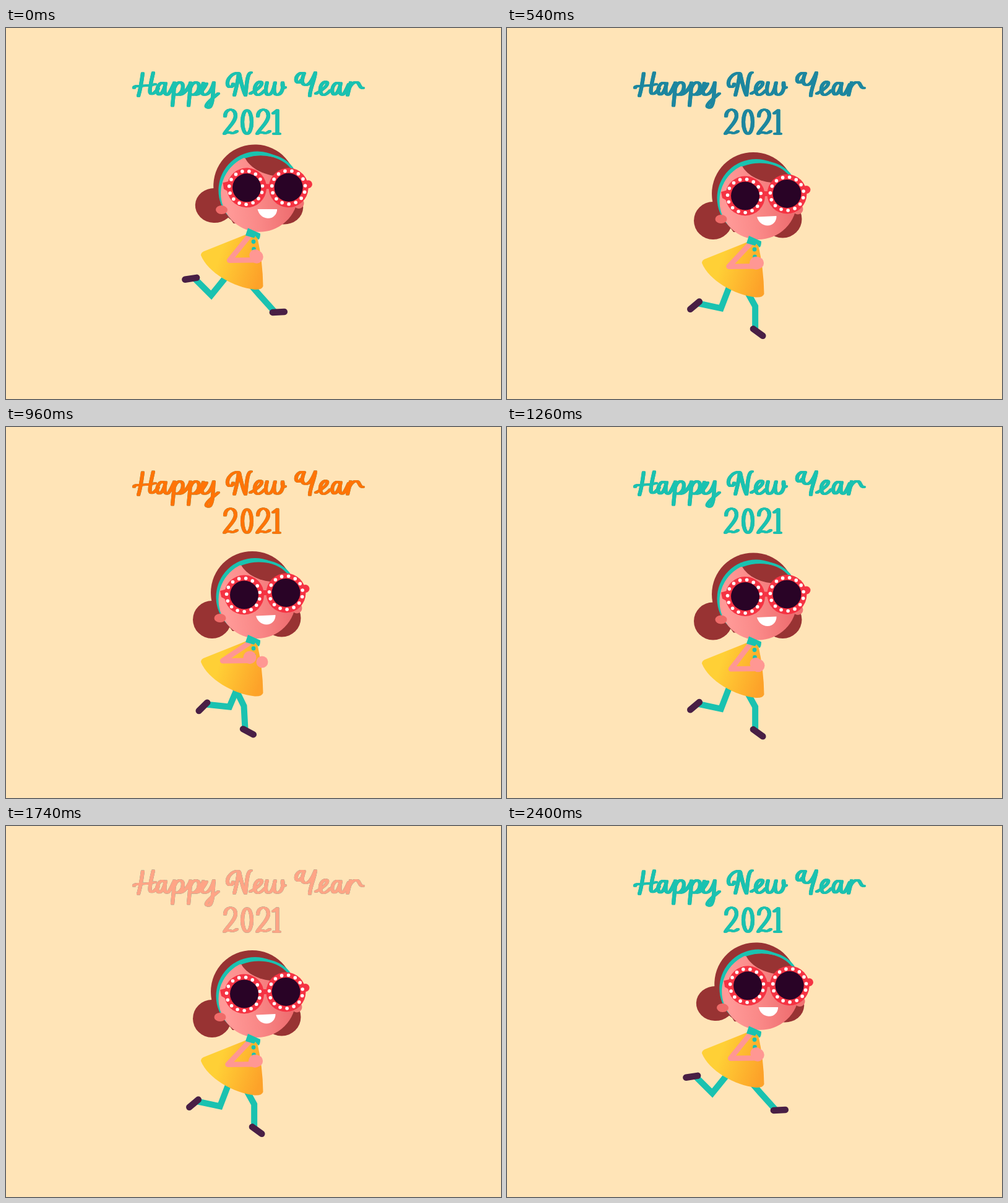
These frames come from a looping animation (800 by 600 pixels, 2.43 s). An HTML page:

```html
<!DOCTYPE html>
<html lang="en">
<head>
<meta charset="utf-8">
<title>Happy New Year 2021</title>
<style>
  html, body { margin: 0; width: 100%; height: 100%; overflow: hidden; background: #ffe4b7; }
  svg { display: block; width: 800px; height: 600px; }
  .line { fill: none; stroke-linecap: round; stroke-linejoin: round; }
  #lettering { stroke: currentColor; stroke-width: 3.2; filter: drop-shadow(0 0 .4px #2a9d92); }
  .leg { stroke: #1ac2b0; stroke-width: 10; stroke-linejoin: miter; stroke-linecap: butt; }
  .shoe { stroke: #491f45; stroke-width: 10.5; }
  .dots { fill: none; stroke: #fff; stroke-width: 5.6; stroke-linecap: round; stroke-dasharray: 0 11.31; stroke-dashoffset: -6.6; }
  .hair { fill: #983333; }
  .teal { fill: #1ac2b0; }
  .skin { fill: #ff9793; }
</style>
</head>
<body>
<svg viewBox="0 0 800 600">
  <defs>
    <linearGradient id="faceTone" x1="0" y1=".55" x2="1" y2=".45">
      <stop offset=".1" stop-color="#ff9997"/><stop offset=".5" stop-color="#f98786"/><stop offset="1" stop-color="#ec686b"/>
    </linearGradient>
    <linearGradient id="dressTone" x1="0" y1=".3" x2="1" y2=".6">
      <stop offset=".3" stop-color="#ffd036"/><stop offset="1" stop-color="#fda229"/>
    </linearGradient>
    <path id="a" d="M257 91C249 83 242 98 245 105C248 112 255 104 258 89C256 98 255 107 260 108C264 108 267 99 271 91"/>
    <path id="p" d="M272 88C272 100 270 114 269 126M271 101C274 85 286 85 286 94C286 104 278 110 273 107M281 108C288 107 294 98 298 90"/>
    <path id="e" d="M395 106C404 101 415 94 413 88C409 84 401 92 402 101C403 112 411 109 418 101"/>
    <path id="two" d="M354 143C354 129 371 128 371 142C371 152 358 162 353 171C360 165 366 174 373 167"/>
    <g id="words">
      <path d="M221 73C219 88 217 100 214 110M207 97C207 91 222 96 241 91M238 72C235 86 231 100 233 105C236 110 242 103 246 98"/>
      <use href="#a"/><use href="#p"/><use href="#p" x="26"/>
      <path d="M319 89C316 98 315 108 321 108C328 108 333 98 336 88C334 98 336 128 327 129C317 127 332 115 343 106"/>
      <path d="M367 90C367 96 359 98 358 91C357 82 366 72 376 73C375 88 371 100 369 109M377 74C380 88 383 102 387 109C389 95 389 73 396 72"/>
      <use href="#e"/>
      <path d="M422 88C419 99 419 108 424 108C430 108 433 98 435 88C432 99 433 108 438 108C445 108 449 98 447 88C446 95 448 99 451 96"/>
      <path d="M477 84C476 90 470 89 469 85C468 78 474 71 482 73C477 85 478 92 484 92C491 93 496 82 500 72C498 87 491 99 491 110"/>
      <use href="#e" x="106"/><use href="#a" x="283"/>
      <path d="M557 88C555 97 553 104 552 109M553 102C556 92 562 86 568 88C572 90 571 98 577 97"/>
      <use href="#two"/><use href="#two" x="53"/>
      <ellipse cx="389.500" cy="152" rx="7.500" ry="19"/>
      <path d="M432 138L438.500 133V171M433 171H442"/>
    </g>
  </defs>

  <!-- Shifted copies act as a broad nib: thick upright strokes, thin level ones. -->
  <g id="lettering" class="line" role="img" aria-label="Happy New Year 2021">
    <use href="#words" x="-1.500"/><use href="#words"/><use href="#words" x="1.500"/>
  </g>

  <g class="line">
    <path id="backLeg" class="leg"/><path id="frontLeg" class="leg"/>
    <path id="backShoe" class="shoe"/><path id="frontShoe" class="shoe"/>
  </g>

  <g id="head">
    <g id="buns" class="hair">
      <ellipse class="bun" cx="333" cy="311.500" rx="31"/><ellipse class="bun" cx="445.500" cy="309" rx="31"/>
    </g>
    <circle class="hair" cx="398" cy="268" r="67"/>
    <path class="hair" d="M334 285L366 330L395 330V285Z"/>
    <circle cx="470" cy="293" r="8.500" fill="#f07272"/>
    <circle class="teal" cx="402.500" cy="275" r="63"/>
    <circle cx="406" cy="279.500" r="62.500" fill="url(#faceTone)"/>
    <path class="hair" d="M380 223C390 242 420 256 461 249L459 240C440 218 408 213 380 223Z"/>
    <path class="line" d="M380 222C406 212 439 215 457 237" stroke="#1ac2b0" stroke-width="4"/>
    <ellipse cx="346" cy="309" rx="9.500" ry="7" fill="#ef6b69"/>
    <g fill="#f53343">
      <path d="M346 265L357 262V280L348 275ZM412 264H425V272H412Z"/>
      <circle cx="484" cy="261.500" r="6.500"/>
      <circle cx="385" cy="271.500" r="32"/><circle cx="452.500" cy="268.500" r="32"/>
    </g>
    <circle class="dots" cx="383.500" cy="271.500" r="27"/><circle class="dots" cx="452.500" cy="268" r="27"/>
    <g fill="#290326"><circle cx="385" cy="271.500" r="23"/><circle cx="452.500" cy="268" r="23"/></g>
    <path d="M404 305.500L435.500 304C436 312 430 319.500 421 319.500C412 319.500 406 313 404 305.500Z" fill="#fff"/>
  </g>

  <g id="torso">
    <path d="M389 346L406 350Q415 390 415.500 430Q414 436 402 435.500C368 432 326 408 315 380Q315 376 319 374Z" fill="url(#dressTone)"/>
    <circle class="teal" cx="400" cy="358" r="3.400"/><circle class="teal" cx="400.500" cy="370" r="3.400"/>
  </g>
  <circle id="farHand" class="skin" r="9.500"/>
  <path id="arm" class="line" stroke="#ff9793" stroke-width="8.500"/>
  <circle id="hand" class="skin" r="10.500"/>
  <path id="collar" class="teal" d="M391 336L411 345Q411 353 408 355L403 349L401 352L387 348Z"/>
</svg>
<script>
const LOOP = 2430, TICK = 30, STRIDE = 600, TITLE_BEAT = 300;
const TEAL = '#1ac2b0', ACCENTS = ['#1d869f', '#ff7406', '#ffa586'];
const THIGH = 56, SHIN = 39;

// Key poses of each leg: hip x, then the angles of thigh, shin and foot in degrees.
const LEGS = {
  back: { stride: [366, 111, 192, 140], gather: [383, 113, 186, 135], flight: [367, 129, 225, 171] },
  front: { stride: [374, 61, 90, 36], gather: [360, 64, 87, 28], flight: [372, 49, 48, -3] }
};

const $ = id => document.getElementById(id);
const set = (el, attrs) => { for (const k in attrs) el.setAttribute(k, attrs[k]); };
const polyline = (id, ...points) => set($(id), { d: 'M' + points.join(' ') });
const place = (id, [cx, cy]) => set($(id), { cx, cy });
const mix = (a, b, k) => a.map((x, i) => x + (b[i] - x) * k);
const rad = deg => deg * Math.PI / 180;
const along = ([x, y], deg, length) => [x + length * Math.cos(rad(deg)), y + length * Math.sin(rad(deg))];

// Brief peak around a moment of the stride.
function pulse(phase, peak) {
  const gap = Math.abs(phase - peak);
  return Math.max(0, 1 - Math.min(gap, STRIDE - gap) / 60);
}

function drawLeg(side, gather, hop, lift) {
  const keys = LEGS[side];
  const [hipX, thigh, shin, foot] = mix(mix(keys.stride, keys.gather, gather), keys.flight, hop);
  const hip = [hipX, 401 + lift];
  const knee = along(hip, thigh, THIGH), ankle = along(knee, shin, SHIN);
  polyline(side + 'Leg', hip, knee, ankle);
  polyline(side + 'Shoe', along(ankle, foot, -4), along(ankle, foot, 15));
}

function draw(t) {
  const phase = t % STRIDE, turn = phase / STRIDE * 360;
  const hop = pulse(phase, 0);
  const lift = 2.5 * pulse(phase, 60) - 12.5 * hop;
  const gather = .5 - .62 * Math.cos(rad(turn));
  for (const side in LEGS) drawLeg(side, gather, hop, lift);

  const sway = 6 * Math.cos(rad(turn - 30));
  const elbow = [356 + sway, 383.5 + lift + .9 * sway];
  const hand = [elbow[0] + 44, elbow[1] - 5.5];
  polyline('arm', [392, 350 + lift], elbow, [hand[0], hand[1] + 5]);
  place('hand', hand);
  place('farHand', [408 - sway, 380 + lift]);

  for (const id of ['torso', 'collar']) set($(id), { transform: `translate(0 ${lift})` });
  set($('head'), { transform: `translate(${hop} ${lift}) rotate(${2.5 * hop} 402 342)` });
  set($('buns'), { transform: `translate(${hop} ${-9 * hop})` });
  document.querySelectorAll('.bun').forEach(bun => set(bun, { ry: 30.5 - 2.5 * hop }));

  const beat = Math.floor(t / TITLE_BEAT);
  $('lettering').style.color = beat % 2 && ACCENTS[(beat - 1) / 2] || TEAL;
}

const start = performance.now();
function frame() {
  const t = (performance.now() - start) % LOOP;
  draw(Math.floor(t / TICK) * TICK);
  requestAnimationFrame(frame);
}
frame();
</script>
</body>
</html>
```
